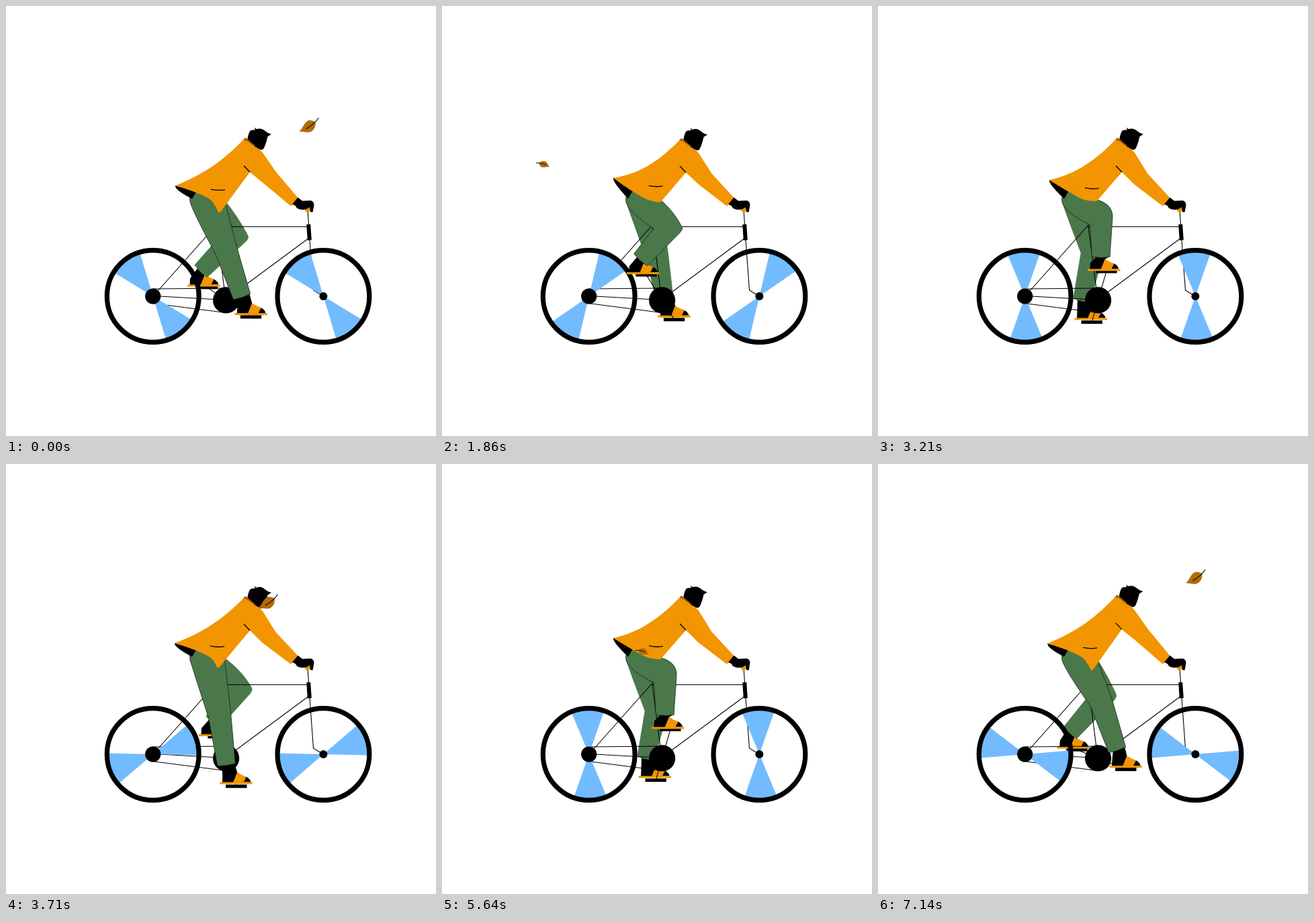
An HTML page with a canvas that plays this animation: 640x640 px, repeating every 7.21 s.

```html
<!DOCTYPE html>
<html lang="en">
<head>
<meta charset="utf-8">
<title>Cyclist in the wind</title>
<style>
  html, body { margin: 0; width: 100%; height: 100%; overflow: hidden; background: #fff; }
  canvas { display: block; width: 640px; height: 640px; }
</style>
</head>
<body>
<canvas id="stage" width="640" height="640"></canvas>
<script>
const ctx = document.getElementById('stage').getContext('2d');
const LOOP = 7210, STEPS = 101, TICKS = 180;
const BLACK = '#000', ORANGE = '#f29500', GREEN = '#4b784a', BLUE = '#73bbff', BROWN = '#b26b08';
const CRANK = [327.6, 437.9], HIP = [300, 285];
const NEAR_REACH = 44.5, FAR_REACH = 34;

const mod = (a, m) => ((a % m) + m) % m;
const sin = deg => Math.sin(deg * Math.PI / 180);
const cos = deg => Math.cos(deg * Math.PI / 180);
const add = (p, q, k = 1) => [p[0] + q[0] * k, p[1] + q[1] * k];
const lerp = (p, q, u) => [p[0] + (q[0] - p[0]) * u, p[1] + (q[1] - p[1]) * u];
const heading = (p, q) => {
  const d = Math.hypot(q[0] - p[0], q[1] - p[1]);
  return [(q[0] - p[0]) / d, (q[1] - p[1]) / d];
};
const smooth = u => {
  u = Math.max(0, Math.min(1, u));
  return u * u * (3 - 2 * u);
};

// sum of harmonics: mean, then a cosine and a sine weight for each order
function wave(angle, mean, ...weights) {
  return weights.reduce((sum, w, i) => {
    const order = (i >> 1) + 1;
    return sum + w * (i % 2 ? sin : cos)(order * angle);
  }, mean);
}

function fill(color) { ctx.fillStyle = color; ctx.fill(); }
function stroke(color, width) { ctx.strokeStyle = color; ctx.lineWidth = width; ctx.stroke(); }
function trace(points) {
  ctx.beginPath();
  points.forEach(p => ctx.lineTo(p[0], p[1]));
}
function poly(color, points) { trace(points); ctx.closePath(); fill(color); }
function line(points, width = 1.1) { trace(points); stroke(BLACK, width); }
function disc(x, y, r, color = BLACK) { ctx.beginPath(); ctx.arc(x, y, r, 0, 7); fill(color); }

const pedalAt = (angle, reach) => add(CRANK, [cos(angle), sin(angle)], reach);

function drawShoe(x, y, hemBack, hemFront) {
  poly(BLACK, [[x + 3.5, y + 1], [x + 4, y - 9], lerp(hemBack, hemFront, 0.25),
    lerp(hemBack, hemFront, 0.95), [x + 26, y - 14.5], [x + 20, y + 1]]);
  ctx.beginPath();
  ctx.moveTo(x + 19.5, y + 1);
  ctx.lineTo(x + 26, y - 14.5);
  ctx.quadraticCurveTo(x + 33, y - 10, x + 39.5, y - 8);
  ctx.lineTo(x + 36, y + 1);
  fill(ORANGE);
  ctx.beginPath();
  ctx.moveTo(x + 35.5, y);
  ctx.lineTo(x + 39.5, y - 8);
  ctx.quadraticCurveTo(x + 46, y - 4, x + 46, y);
  fill(BLACK);
  ctx.fillStyle = ORANGE;
  ctx.fillRect(x, y, 48.5, 3);
}

function drawLeg(angle, reach, far) {
  const s = sin(angle);
  const pedal = pedalAt(angle, reach);
  const shift = far ? [5 - 5 * s, 3.5 - 5.5 * s] : [0, 0];
  const knee = add(shift, [
    wave(angle, 328.1, 5.6, -9.3, 2.2, 1.3, 3.5, -1.6),
    wave(angle, 344.7, -2, 25.7, -3.6, 7.1)
  ]);
  const ankle = add(pedal, [-11.5 - 3.5 * s, -27 - 5.5 * s]);

  // mitred knee, square hem
  const thigh = heading(HIP, knee), shin = heading(knee, ankle);
  const bend = heading([0, 0], add(thigh, shin));
  const across = [bend[1], -bend[0]];
  const half = 16.8 / Math.max(0.6, bend[0] * shin[0] + bend[1] * shin[1]);
  const kneeBack = add(knee, across, -half), kneeFront = add(knee, across, half);
  const hemBack = add(ankle, [shin[1], -shin[0]], -13.3);
  const hemFront = add(ankle, [shin[1], -shin[0]], 13.3);

  const waist = [325, 288];
  const bulge = Math.max(0, 345 - knee[1] + shift[1]) * 0.42;
  const over = add(lerp(waist, kneeFront, 0.5), [0.85, -0.55], bulge);

  ctx.fillStyle = BLACK;
  ctx.fillRect(pedal[0] - 15.7, pedal[1] - 2.5, 31.4, 5);
  drawShoe(pedal[0] - 26.8 + 2.6 * cos(angle - 40), pedal[1] - 5 - 1.3 * s, hemBack, hemFront);

  ctx.beginPath();
  ctx.moveTo(281, 270);
  ctx.quadraticCurveTo(272, 281, 274, 292);
  ctx.quadraticCurveTo(279, 308, ...kneeBack);
  ctx.lineTo(...hemBack);
  ctx.quadraticCurveTo(...add(ankle, shin, 2), ...hemFront);
  ctx.lineTo(...lerp(kneeFront, hemFront, 0.1));
  ctx.quadraticCurveTo(...kneeFront, ...lerp(kneeFront, over, 0.15));
  ctx.quadraticCurveTo(...over, ...waist);
  ctx.lineTo(318, 270);
  ctx.closePath();
  fill(GREEN);
  if (!far) stroke('#16241a', 0.8);
}

function drawFrame() {
  line([[226, 424], [311, 328.5], [448, 328.5]]);
  line([[312, 320], [327, 437], [450, 346]]);
  line([[218, 421], [327, 420]]);
  line([[218, 442.5], [327, 456.5]]);
  line([[228, 432], [327, 437.5]]);
  line([[449, 303], [452, 348], [457.5, 423], [472, 432]]);
  line([[450.2, 325], [451.8, 348.5]], 6);
}

function drawWheel(x, turn, hub) {
  const y = 432, rad = Math.PI / 180;
  for (const side of [0, 180]) {
    ctx.beginPath();
    ctx.moveTo(x, y);
    ctx.arc(x, y, 66, (turn + side - 21) * rad, (turn + side + 21) * rad);
    fill(BLUE);
  }
  ctx.beginPath();
  ctx.arc(x, y, 68.4, 0, 7);
  stroke(BLACK, 7.2);
  disc(x, y, hub);
}

function drawJacket(angle, hx, hy) {
  const tail = [253 - 2 * sin(angle), 261.5 + 6 * cos(angle - 40)];
  const tip = [320.5 - 4.5 * sin(angle), 297 + 7 * cos(angle - 35) + 4 * cos(2 * angle - 70)];
  const elbow = 0.5 + 0.5 * cos(2 * angle - 170);
  const armpit = [363 + hx / 3, 247 + hy * 0.9];

  // lining under the tail
  ctx.beginPath();
  ctx.moveTo(...tail);
  ctx.quadraticCurveTo(tail[0] - 1, tail[1] + 6, 277, 287);
  ctx.lineTo(284, 275);
  fill(BLACK);

  ctx.beginPath();
  ctx.moveTo(356 + hx, 196 + hy);
  ctx.bezierCurveTo(325, 229 + hy / 2, 295, 250, ...tail);
  ctx.quadraticCurveTo(280, 275, 301, 286);
  ctx.quadraticCurveTo(309, 290, tip[0] - 2, tip[1] - 1);
  ctx.quadraticCurveTo(...tip, tip[0] + 2, tip[1] - 2.5);
  ctx.lineTo(...armpit);
  ctx.lineTo(384 - 3 * elbow, 262 + 4 * elbow);
  ctx.lineTo(424, 298);
  ctx.lineTo(435, 286);
  ctx.lineTo(403 - 2 * elbow, 246 + 4 * elbow);
  ctx.lineTo(382 + hx, 218 + hy);
  ctx.quadraticCurveTo(376 + hx, 211 + hy, 369 + hx, 206 + hy);
  ctx.closePath();
  fill(ORANGE);

  line([add(armpit, [-9, -9.5]), armpit], 1.3);
  const px = tail[0] + 53, py = 270 + 4 * cos(angle);
  ctx.beginPath();
  ctx.moveTo(px, py - 0.5);
  ctx.quadraticCurveTo(px + 11, py + 2, px + 21, py);
  stroke(BLACK, 1.3);
}

function drawHead(hx, hy) {
  ctx.save();
  ctx.translate(hx, hy);
  ctx.beginPath();
  ctx.moveTo(359, 200);
  ctx.quadraticCurveTo(361, 186, 365, 184.5);
  ctx.lineTo(371, 184);
  ctx.lineTo(369.5, 180.5);
  ctx.lineTo(373, 183);
  ctx.quadraticCurveTo(380, 180.5, 386, 186);
  ctx.quadraticCurveTo(390, 189.5, 395, 190.5);
  ctx.lineTo(389.5, 194);
  ctx.quadraticCurveTo(387, 205, 383.5, 212);
  ctx.quadraticCurveTo(380, 216, 375, 211.5);
  ctx.lineTo(371, 209.5);
  fill(BLACK);
  poly('#a86506', [[356.5, 195.5], [353, 199], [362, 202], [372.5, 211], [370, 207]]);
  ctx.restore();
}

function drawHand() {
  disc(449, 303, 4, ORANGE);
  ctx.beginPath();
  ctx.moveTo(434.5, 285);
  ctx.lineTo(441, 290);
  ctx.lineTo(453, 289.5);
  ctx.quadraticCurveTo(458, 290, 458.5, 296);
  ctx.lineTo(456.5, 307);
  ctx.lineTo(453, 306.5);
  ctx.lineTo(452, 299.5);
  ctx.quadraticCurveTo(444, 306, 433, 301);
  ctx.lineTo(431, 297.5);
  ctx.lineTo(426, 295);
  fill(BLACK);
}

function drawBody(angle) {
  // two nods per turn of the cranks
  const nod = 2 * (angle - 70);
  const hy = -1.4 + 3.1 * cos(nod) - 0.8 * cos(2 * nod);
  const hx = Math.min(0, hy * 0.6);
  drawJacket(angle, hx, hy);
  drawHead(hx, hy);
  drawHand();
}

function drawLeaf(x, y, turn, scale) {
  ctx.save();
  ctx.translate(x, y);
  ctx.rotate(turn * Math.PI / 180);
  ctx.scale(scale, scale);
  ctx.beginPath();
  ctx.moveTo(-15, -2);
  ctx.bezierCurveTo(-6, -3, -1, -10, 7, -7);
  ctx.quadraticCurveTo(11, -4, 13, 0);
  ctx.bezierCurveTo(9, 8, 0, 11, -6, 6);
  ctx.quadraticCurveTo(-10, 2, -15, -2);
  fill(BROWN);
  ctx.beginPath();
  ctx.moveTo(-4.5, 1);
  ctx.quadraticCurveTo(11, 2, 20, -2);
  stroke(BLACK, 1.1 / Math.sqrt(scale));
  ctx.restore();
}

function drawLeaves(tick) {
  // a large leaf sinks across twice per loop
  const fall = mod(tick - 175, 90) / 27;
  if (fall <= 1) {
    drawLeaf(583 - 513 * Math.pow(fall, 0.8), 132 + 200 * Math.sin(1.3 * fall), -35, 1);
  }
  // a small one is lifted by the wind
  for (const start of [19, 123]) {
    const u = (tick - start) / 40;
    if (u < 0 || u > 1) continue;
    const x = 650 - 638 * (u + 0.1 * Math.sin(Math.PI * u));
    drawLeaf(x, 438 - 202 * smooth((u - 0.1) / 0.5), 197, 0.6);
  }
}

function draw(tick) {
  const angle = mod(34 + 12 * tick, 360), opposite = mod(angle + 180, 360);
  const turn = 52.3 + 36 * tick;
  ctx.fillStyle = '#fff';
  ctx.fillRect(0, 0, 640, 640);
  drawLeg(opposite, FAR_REACH, true);
  drawFrame();
  line([CRANK, pedalAt(opposite, FAR_REACH)]);
  drawWheel(218.7, turn, 11.6);
  drawWheel(472.4, turn, 6);
  disc(...CRANK, 19.6);
  line([CRANK, pedalAt(angle, NEAR_REACH)]);
  drawLeg(angle, NEAR_REACH, false);
  drawBody(angle);
  drawLeaves(tick);
}

const begin = performance.now();
function play() {
  const t = mod(performance.now() - begin, LOOP);
  const step = Math.floor((t + 5) * STEPS / LOOP) % STEPS;
  draw(Math.ceil(step * TICKS / STEPS));
  requestAnimationFrame(play);
}
play();
</script>
</body>
</html>
```
